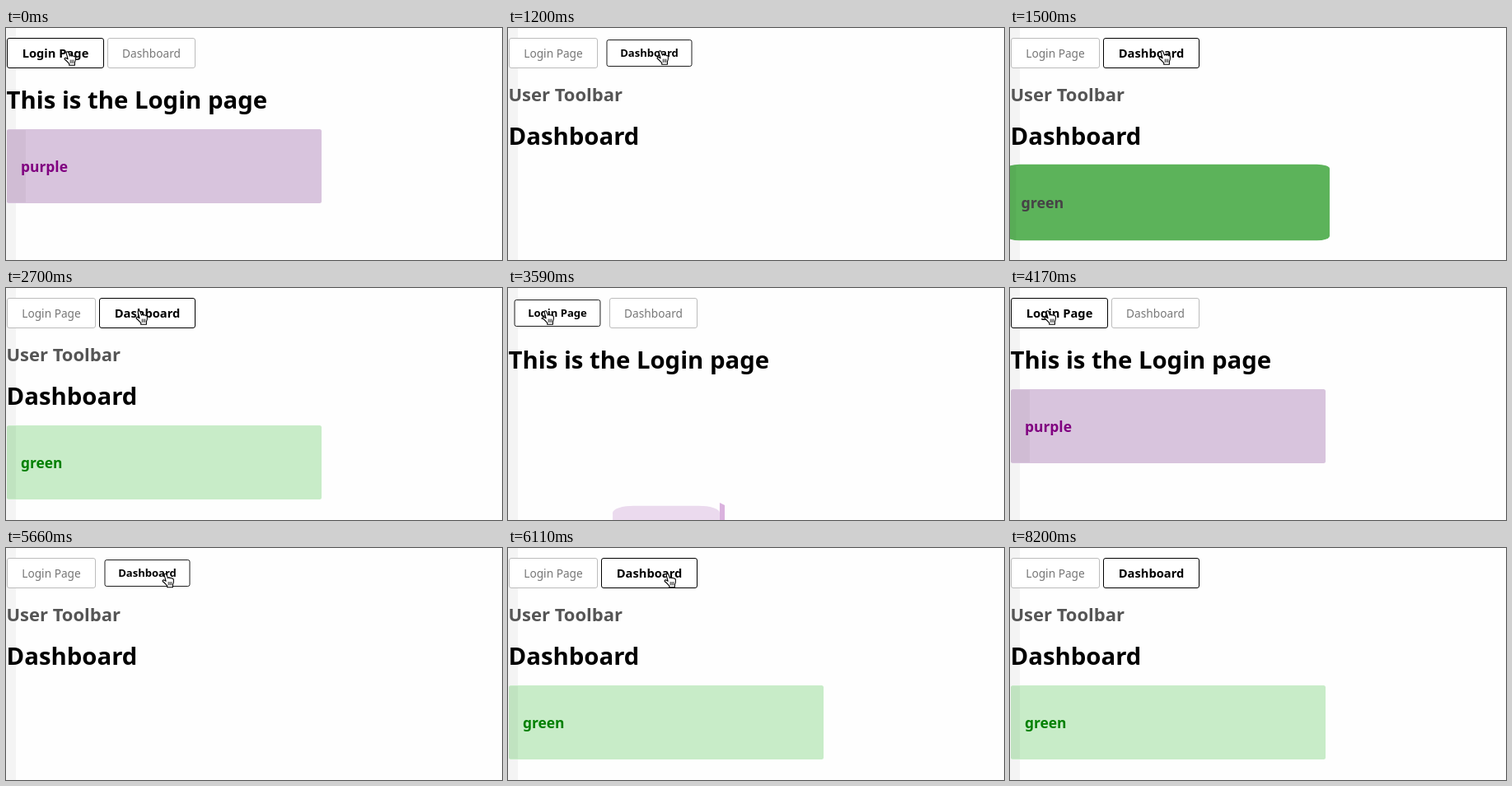
An HTML page that plays this animation: 602x282 px, repeating every 8500 ms.

```html
<!DOCTYPE html>
<html lang="en">
<head>
<meta charset="utf-8">
<title>Page switch</title>
<style>
  html, body { margin: 0; width: 100%; height: 100%; overflow: hidden; background: #fefefe; }
  svg { display: block; width: 602px; height: 282px; font-family: "Noto Sans", "Open Sans", sans-serif; }
  .bold { font-weight: 700; }
  .tab rect { fill: #fff; stroke: #bcbcbc; }
  .tab text { font-size: 13.7px; fill: #777; text-anchor: middle; }
  .tab.active rect { stroke: #000; }
  .tab.active text { font-size: 14.7px; font-weight: 700; fill: #000; }
</style>
</head>
<body>
<svg viewBox="0 0 602 282">
  <rect width="602" height="282" fill="#fefefe"/>
  <rect width="12" height="282" fill="#f4f4f4"/>
  <g id="loginTab" class="tab"><rect y="12.5" height="36" rx="2.5"/><text y="36">Login Page</text></g>
  <g id="dashTab" class="tab"><rect y="12.5" height="36" rx="2.5"/><text y="36">Dashboard</text></g>
  <text id="toolbar" class="bold" x="0.4" y="89" font-size="22" fill="#555">User Toolbar</text>
  <text id="heading" class="bold" x="0.6" font-size="29.3"></text>
  <g id="card">
    <path id="edge" d="M191-56L209-47V45H191Z" fill="#dab2de"/>
    <rect id="panel" x="-191" y="-45" width="382" height="90"/>
    <rect id="shade" x="-191" y="-44" height="88" opacity=".04"/>
    <text id="label" class="bold" x="-174" y="7" font-size="17.4"></text>
  </g>
  <g id="cursor" stroke="#000" stroke-width="1.1" stroke-linejoin="round" stroke-linecap="round">
    <path fill="#fff" d="M3.2 2.6C2.7.8 5.1 0 5.8 1.7L7.5 6.1C8.1 5 9.6 5.2 10 6.2C10.7 5.4 12 5.7 12.3 6.7C13.2 6.2 14.3 6.8 14.4 7.9C14.6 10 14.4 12.2 13.4 14.1V17.2H6.7V15.3C5 13.6 3.6 11.9 1.4 10.3C.4 9.4 1.6 8 2.9 8.6L5.1 9.8Z"/>
    <path fill="none" stroke-width=".8" d="M8.2 11V14.5M10 11V14.5M11.8 11V14.5"/>
  </g>
</svg>
<script>
const LOOP = 8500;
const $ = id => document.getElementById(id);
const set = (el, attrs) => Object.entries(attrs).forEach(([k, v]) => el.setAttribute(k, v));
const show = (el, on) => el.setAttribute("display", on ? "inline" : "none");

const pages = {
  login: {
    title: "This is the Login page", baseline: 98, center: 168, label: "purple", shade: 23,
    soft: [216, 196, 221], strong: [174, 92, 174], ink: [128, 0, 128]
  },
  dash: {
    title: "Dashboard", baseline: 142, center: 212, label: "green", shade: 11,
    soft: [200, 236, 200], strong: [92, 179, 90], ink: [0, 128, 0]
  }
};

// Card poses: scale, vertical offset, tint, corner share, tab scale.
const pose = (scale, dy, tint, round, tab) => ({ scale, dy, tint, round, tab });
const small = pose(.34, 112, -.5, .2, .888);
const big = pose(1.098, 20, 1, .09, .98);
const dropping = pose(1.068, 9, 1, .07, .985);
const over = pose(1.026, 0, 1, .04, 1);
const settling = pose(1.006, 0, .4, .015, 1);
const rest = pose(1, 0, 0, 0, 1);

const scenes = [
  [0, "login", rest],
  [1200, "dash", small], [1350, "dash", big], [1500, "dash", over],
  [1650, "dash", settling], [1800, "dash", rest],
  [3590, "login", small], [3730, "login", big], [3870, "login", over],
  [4020, "login", settling], [4170, "login", rest],
  [5660, "dash", small], [5810, "dash", dropping], [5960, "dash", over], [6110, "dash", rest]
];

const pointer = [
  [0, 70, 28], [600, 98, 27], [750, 157, 26.5], [900, 180, 27],
  [2700, 157, 27], [2850, 72, 27], [2990, 41, 27],
  [4920, 70, 28], [5070, 155, 30], [5220, 189, 30.5],
  [7900, 300, 115], [8050, 558, 268], [8200, 620, 300]
];

const latest = (keys, t) => keys.filter(k => k[0] <= t).pop();
const mix = (a, b, k) => `rgb(${a.map((v, i) => Math.round(v + (b[i] - v) * k))})`;
const scaleAt = (x, y, s) => `translate(${x} ${y}) scale(${s}) translate(${-x} ${-y})`;

function drawTab(tab, x, width, active, scale) {
  const mid = x + width / 2;
  tab.classList.toggle("active", active);
  set(tab, { transform: scaleAt(mid, 30.5, active ? scale : 1) });
  set(tab.firstChild, { x, width });
  set(tab.lastChild, { x: mid });
}

function drawCard(page, p) {
  const entering = p.tint < 0;
  const round = p.round;
  set($("card"), { transform: `translate(192 ${page.center + p.dy}) scale(${p.scale})` });
  set($("panel"), {
    rx: Math.max(2.5, 382 * round),
    ry: Math.max(2.5, 90 * round * 1.4),
    fill: mix(page.soft, entering ? [254, 240, 255] : page.strong, Math.abs(p.tint))
  });
  set($("shade"), { width: page.shade });
  set($("label"), { fill: mix(page.ink, [70, 66, 70], Math.max(0, p.tint)) });
  $("label").textContent = page.label;
  show($("edge"), entering);
  show($("shade"), !entering);
  show($("label"), !entering);
}

function render(t) {
  const [, name, p] = latest(scenes, t);
  const [, x, y] = latest(pointer, t);
  const page = pages[name];
  const login = name === "login";
  drawTab($("loginTab"), 1.5, login ? 117 : 107, login, p.tab);
  drawTab($("dashTab"), login ? 123.5 : 113.5, login ? 106 : 116, !login, p.tab);
  show($("toolbar"), !login);
  set($("heading"), { y: page.baseline });
  $("heading").textContent = page.title;
  drawCard(page, p);
  set($("cursor"), { transform: `translate(${x} ${y})` });
}

const start = performance.now();
function tick() {
  render((performance.now() - start) % LOOP);
  requestAnimationFrame(tick);
}
tick();
</script>
</body>
</html>
```
